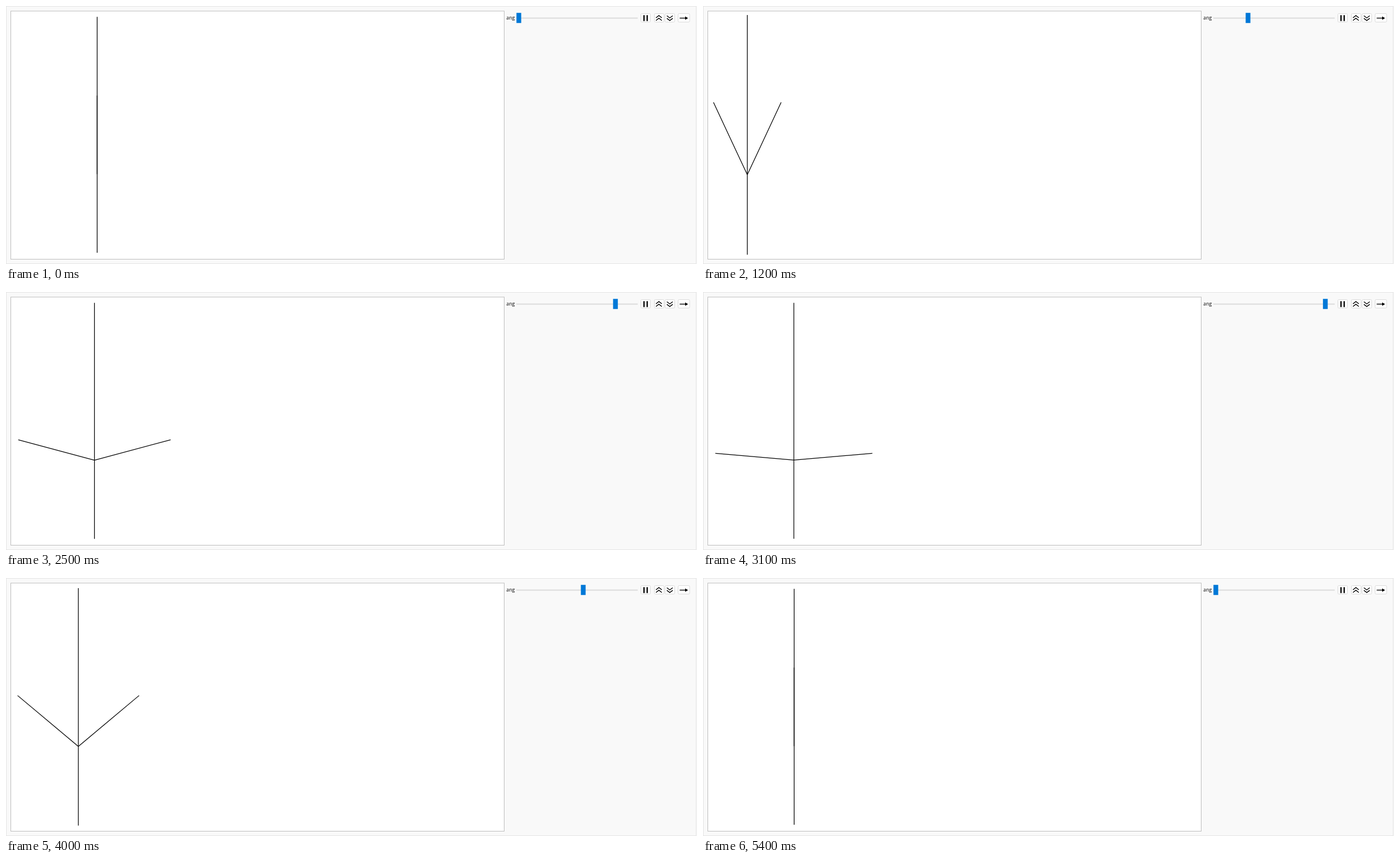
Write an HTML page that moves like this. It is 1224 by 458 pixels and loops after 6 s.

```html
<!DOCTYPE html>
<html lang="en">
<head>
<meta charset="utf-8">
<title>Angle slider</title>
<style>
  html, body { margin: 0; width: 100%; height: 100%; overflow: hidden; background: #f9f9f9; }
  svg { display: block; width: 1224px; height: 458px; }
  .button { fill: #fff; stroke: #dadada; }
  .icon { fill: none; stroke: #000; stroke-width: 1.4; }
  .tree { stroke: #000; stroke-width: 1.25; }
</style>
</head>
<body>
<svg viewBox="0 0 1224 458">
  <rect width="1224" height="458" fill="#f9f9f9"/>
  <rect x="0.5" y="0.5" width="1222" height="457" fill="none" stroke="#e4e4e4"/>
  <rect x="8.5" y="9" width="874" height="440.5" fill="#fff" stroke="#bdbdbd"/>

  <g class="tree">
    <line id="trunk"/>
    <line id="left"/>
    <line id="right"/>
  </g>

  <text x="886.3" y="24" font-family="'Open Sans', 'Noto Sans', sans-serif" font-size="8.7">ang</text>
  <rect x="904" y="20.5" width="215" height="2" fill="#dcdcdc"/>
  <rect id="thumb" y="12.2" width="8.4" height="18" fill="#0078d7"/>

  <g class="button">
    <rect x="1124.5" y="13.5" width="17" height="15" rx="2"/>
    <rect x="1148.5" y="13.5" width="17" height="15" rx="2"/>
    <rect x="1167.5" y="13.5" width="17" height="15" rx="2"/>
    <rect x="1190.5" y="13.5" width="20.5" height="15" rx="2"/>
  </g>
  <path d="M1129 16.3h2.3v10.4h-2.3zM1134.6 16.3h2.3v10.4h-2.3z"/>
  <g class="icon">
    <path d="M1151.3 21l5.2-4 5.2 4M1151.3 25.7l5.2-4 5.2 4"/>
    <path d="M1170.6 17.2l5.2 4 5.2-4M1170.6 21.9l5.2 4 5.2-4"/>
    <path d="M1193.3 21.5h11"/>
  </g>
  <path d="M1203 18.6l5.2 2.9-5.2 2.9z"/>
</svg>
<script>
  const LOOP = 6000, STEPS = 18, MID_Y = 228.7;
  const el = id => document.getElementById(id);
  const trunk = el('trunk'), left = el('left'), right = el('right'), thumb = el('thumb');

  function setLine(line, x1, y1, x2, y2) {
    Object.entries({ x1, y1, x2, y2 }).forEach(([k, v]) => line.setAttribute(k, v.toFixed(2)));
  }

  // The angle rises and falls in 5° steps, sampled on a 100 ms clock.
  function stepAt(ms) {
    const tick = Math.floor(ms / 100) - 6;
    const n = Math.min(2 * STEPS, Math.max(0, Math.ceil((tick + 0.39) / 1.365)));
    return STEPS - Math.abs(n - STEPS);
  }

  function draw(ms) {
    const step = stepAt(ms);
    const a = step * 5 * Math.PI / 180;
    // A flat plot falls back to the full unit range.
    const halfWidth = step ? Math.sin(a) : 1;
    const pad = 13.55 + 5.8 * halfWidth;
    const len = (MID_Y - pad) * 2 / 3;
    const x = pad + 2.55 + len * halfWidth;
    const fork = MID_Y + len / 2;
    const dx = len * Math.sin(a), tipY = fork - len * Math.cos(a);

    setLine(trunk, x, fork + len, x, fork - 2 * len);
    setLine(left, x, fork, x - dx, tipY);
    setLine(right, x, fork, x + dx, tipY);
    thumb.setAttribute('x', (904.2 + 11.41 * step).toFixed(2));
  }

  const start = performance.now();
  function tick() {
    draw((performance.now() - start) % LOOP);
    requestAnimationFrame(tick);
  }
  tick();
</script>
</body>
</html>
```
